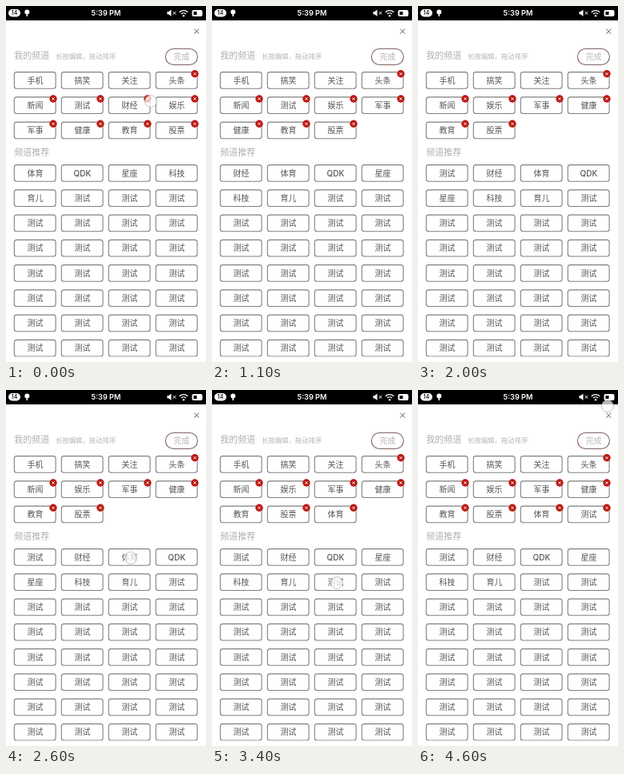
Recreate the animation shown at these times as an HTML page with a canvas. Size 250 by 445 pixels, loop 4.7 s.

```html
<!DOCTYPE html>
<html lang="zh">
<head>
<meta charset="utf-8">
<title>频道编辑</title>
<style>
html, body { margin: 0; width: 100%; height: 100%; overflow: hidden; background: #fff; }
canvas { display: block; width: 250px; height: 445px; }
</style>
</head>
<body>
<canvas id="stage"></canvas>
<script>
const W = 250, H = 445, LOOP = 4700;
const canvas = document.getElementById('stage');
const ctx = canvas.getContext('2d');
const ratio = Math.max(1, window.devicePixelRatio || 1);
canvas.width = W * ratio;
canvas.height = H * ratio;

const FONT = 'Inter, "Noto Sans CJK SC", "Noto Sans CJK JP", sans-serif';
const COLS = 4, PITCH_X = 59, PITCH_Y = 31.25, BOX_W = 51.8, BOX_H = 20.6;
const TOP = { mine: 92.9, more: 208.9 };
const LEFT = 36.2, CLIP_Y = 438.5;
const FLY = 360, SHIFT = 250, FIXED = 3;

const moves = [
  { at: 200, lag: 20, from: 'mine', i: 6, to: 'more', j: 0, tap: [181, 119] },
  { at: 1401, lag: 16, from: 'mine', i: 5, to: 'more', j: 0, tap: [120, 119] },
  { at: 2735, lag: 17, from: 'more', i: 2, to: 'mine', j: 10, tap: [156, 210] },
  { at: 3584, lag: 33, from: 'more', i: 6, to: 'mine', j: 11, tap: [156, 241] }
];

const item = label => ({ label });
const start = {
  mine: '手机 搞笑 关注 头条 新闻 测试 财经 娱乐 军事 健康 教育 股票'.split(' ').map(item),
  more: '体育 QDK 星座 科技 育儿'.split(' ').concat(Array(40).fill('测试')).map(item)
};

// Board before and after every move
const boards = [start];
for (const m of moves) {
  const last = boards[boards.length - 1];
  const next = { mine: [...last.mine], more: [...last.more] };
  m.item = next[m.from].splice(m.i, 1)[0];
  next[m.to].splice(m.j, 0, m.item);
  boards.push(next);
}

const ease = p => 0.5 - Math.cos(Math.PI * Math.min(1, Math.max(0, p))) / 2;
const lerp = (a, b, p) => a + (b - a) * p;
const slot = (list, i) => [
  LEFT + (i % COLS) * PITCH_X,
  TOP[list] + Math.floor(i / COLS) * PITCH_Y
];
const between = (a, b, p) => [lerp(a[0], b[0], p), lerp(a[1], b[1], p)];

function text(str, x, y, size, color, align = 'center', weight = 400) {
  ctx.font = `${weight} ${size}px ${FONT}`;
  ctx.textAlign = align;
  ctx.fillStyle = color;
  ctx.fillText(str, x, y + size * 0.37);
}

function box(x, y, w, h, r, fill, stroke, line = 1) {
  ctx.beginPath();
  ctx.roundRect(x, y, w, h, r);
  if (fill) { ctx.fillStyle = fill; ctx.fill(); }
  if (stroke) { ctx.strokeStyle = stroke; ctx.lineWidth = line; ctx.stroke(); }
}

function disc(x, y, r, fill, stroke) {
  ctx.beginPath();
  ctx.arc(x, y, r, 0, Math.PI * 2);
  ctx.fillStyle = fill;
  ctx.fill();
  if (stroke) { ctx.strokeStyle = stroke; ctx.lineWidth = 1; ctx.stroke(); }
}

function cross(x, y, r, color, line) {
  ctx.beginPath();
  ctx.moveTo(x - r, y - r); ctx.lineTo(x + r, y + r);
  ctx.moveTo(x + r, y - r); ctx.lineTo(x - r, y + r);
  ctx.strokeStyle = color;
  ctx.lineWidth = line;
  ctx.stroke();
}

function shape(points, fill) {
  ctx.beginPath();
  points.forEach(([x, y]) => ctx.lineTo(x, y));
  ctx.closePath();
  ctx.fillStyle = fill;
  ctx.fill();
}

function chip(label, [x, y], badge) {
  box(x - BOX_W / 2, y - BOX_H / 2, BOX_W, BOX_H, 3, '#fff', '#808080', 1.1);
  text(label, x + 0.2, y + 0.1, 10, '#555', 'center', 500);
  if (badge) {
    const bx = x + BOX_W / 2 - 3.1, by = y - BOX_H / 2 + 2.2;
    disc(bx, by, 4.7, '#bd1812');
    cross(bx, by, 1.6, '#fff', 0.9);
  }
}

function wifi(x, y) {
  disc(x, y - 0.8, 1.2, '#fff');
  ctx.strokeStyle = '#fff';
  ctx.lineWidth = 1.3;
  for (const r of [4.2, 7.4]) {
    ctx.beginPath();
    ctx.arc(x, y, r, -Math.PI * 0.75, -Math.PI * 0.25);
    ctx.stroke();
  }
}

function statusBar() {
  ctx.fillStyle = '#000';
  ctx.fillRect(0, 0, W, 18);
  box(3, 4, 15, 9.5, 4.7, '#fff');
  text('14', 10.5, 8.8, 7, '#000', 'center', 500);
  disc(26.3, 7.4, 3, '#fff');
  ctx.fillRect(25.5, 9, 1.6, 4);
  text('5:39 PM', 125, 8.8, 9.2, '#fff', 'center', 600);
  shape([[201.5, 7], [203.5, 7], [206.5, 4.5], [206.5, 13], [203.5, 10.5], [201.5, 10.5]], '#fff');
  cross(210.5, 8.8, 1.8, '#fff', 1);
  wifi(222, 13);
  box(232.5, 5, 13, 8, 2, '#fff');
  ctx.fillStyle = '#000';
  ctx.fillRect(234.5, 7, 4, 4);
}

function header() {
  cross(238.3, 31.7, 3, '#505050', 0.9);
  text('我的频道', 10.3, 62, 11, '#b0b0b0', 'left');
  text('长按编辑，拖动排序', 62, 62.5, 8.4, '#b5b5b5', 'left');
  box(199.4, 53.5, 40, 20, 10, '#fff', '#826464', 1.1);
  text('完成', 219.6, 63.5, 10, '#b4b4b4', 'center', 500);
  text('频道推荐', 10.3, 183, 11, '#b0b0b0', 'left');
}

function touch(x, y) {
  disc(x, y, 7.5, 'rgba(255,255,255,0.72)', 'rgba(150,150,150,0.55)');
}

function channels(t) {
  const n = moves.filter(m => t >= m.at).length;
  const move = moves[n - 1];
  const now = boards[n], before = boards[Math.max(0, n - 1)];
  const flying = move && t < move.at + FLY;
  const p = move ? ease((t - move.at - move.lag) / SHIFT) : 1;

  ctx.save();
  ctx.beginPath();
  ctx.rect(0, 0, W, CLIP_Y);
  ctx.clip();
  for (const list of ['mine', 'more']) {
    now[list].forEach((it, i) => {
      if (flying && it === move.item) return;
      const old = before[list].indexOf(it);
      const pos = between(slot(list, old < 0 ? i : old), slot(list, i), p);
      chip(it.label, pos, list === 'mine' && i >= FIXED);
    });
  }
  if (flying) {
    const pos = between(slot(move.from, move.i), slot(move.to, move.j), ease((t - move.at) / FLY));
    chip(move.item.label, pos, move.from === 'mine');
  }
  ctx.restore();
}

function draw(t) {
  ctx.setTransform(ratio, 0, 0, ratio, 0, 0);
  ctx.fillStyle = '#fff';
  ctx.fillRect(0, 0, W, H);
  statusBar();
  header();
  channels(t);
  for (const m of moves) {
    if (t >= m.at - 200 && t < m.at - 80) touch(...m.tap);
  }
  if (t >= 4600) touch(237, 20);
}

const t0 = performance.now();
function frame() {
  draw((performance.now() - t0) % LOOP);
  requestAnimationFrame(frame);
}
frame();
</script>
</body>
</html>
```
